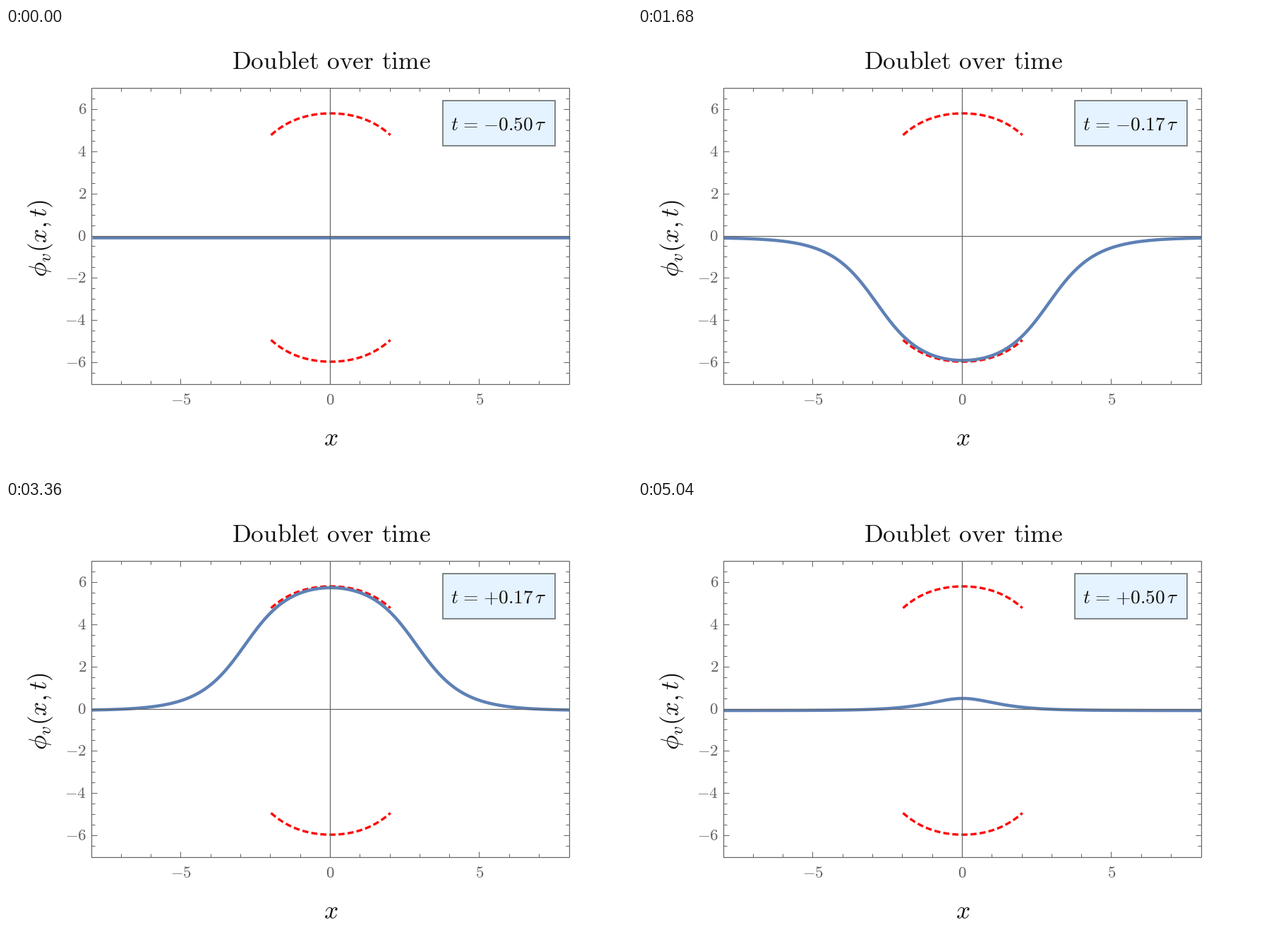
A matplotlib script that plays this animation: 887x631 px, repeating every 5.12 s.

```python
import numpy as np
import matplotlib.pyplot as plt
from matplotlib.animation import FuncAnimation
from matplotlib.patches import Rectangle

W, H, DPI = 887, 631, 64
FRAMES, INTERVAL = 64, 80
PT = 72 / DPI                       # points per pixel

X0, Y0 = 458.9, 294.5               # position of the origin
SX, SY = 42.3, 29.92                # pixels per unit
LEFT, RIGHT, TOP, BOTTOM = 120.5, 797.5, 84.5, 504.5
GREY, BLUE, RED = "#626262", "#5e81b5", "#ff0505"

V = 0.1
GAMMA = 1 / np.sqrt(1 + V**2)
TAU = 2 * np.pi / (GAMMA * V)

plt.rcParams["mathtext.fontset"] = "cm"
fig = plt.figure(figsize=(W / DPI, H / DPI), dpi=DPI, facecolor="white")
ax = fig.add_axes([0, 0, 1, 1])
ax.set_xlim(0, W)
ax.set_ylim(H, 0)
ax.axis("off")


def doublet(x, phase):
    return 4 * np.arctan(np.sin(phase) / (V * np.cosh(GAMMA * x)))


def curve_points(x, phase):
    """Pixel positions of the curve, which sits slightly below the axis."""
    return X0 + 1.2 + SX * x, Y0 + 2.6 - SY * doublet(x, phase)


def label(x, y, tex, size, color="#111111", ha="center", **kw):
    return ax.text(x, y, f"${tex}$", fontsize=size * PT, color=color,
                   ha=ha, va="baseline", **kw)


def rule(xs, ys, width=1.2, z=4):
    ax.plot(xs, ys, color=GREY, lw=width * PT, zorder=z,
            solid_capstyle="butt")


def draw_frame():
    ax.add_patch(Rectangle((LEFT, TOP), RIGHT - LEFT, BOTTOM - TOP,
                           fill=False, ec=GREY, lw=1.2 * PT, zorder=4))
    rule([LEFT, RIGHT], [Y0, Y0])
    rule([X0, X0], [TOP, BOTTOM])

    for n in range(-7, 8):
        x, size = X0 + SX * n, 8 if n % 5 == 0 else 5
        rule([x, x], [TOP, TOP + size], 1)
        rule([x, x], [BOTTOM, BOTTOM - size], 1)
        if n % 5 == 0:
            label(x + 0.3, 534.5, n, 23, GREY)

    for n in range(-13, 14):
        y, size = Y0 - SY * n / 2, 8 if n % 4 == 0 else 5
        rule([LEFT, LEFT + size], [y, y], 1)
        rule([RIGHT, RIGHT - size], [y, y], 1)
        if n % 4 == 0:
            label(114, y + 7, n // 2, 23, GREY, ha="right")


def draw_envelope():
    x = np.linspace(-2, 2, 200)
    for phase in (np.pi / 2, -np.pi / 2):
        ax.plot(*curve_points(x, phase), color=RED, lw=3.4 * PT, zorder=2,
                dashes=(8.6 / 3.4, 4.3 / 3.4), dash_capstyle="butt")


draw_frame()
draw_envelope()
gap = r"\hspace{0.38}"
label(460.5, 58.4, rf"\mathrm{{Doublet}}{gap}\mathrm{{over}}{gap}\mathrm{{time}}",
      35.3)
label(460.5, 592, "x", 35.3)
label(58, 297.5, r"\phi_v(x,t)", 35.3, rotation=90, rotation_mode="anchor")

ax.add_patch(Rectangle((619, 103), 159, 64, fc="#e5f2ff",
                       ec="#808688", lw=2 * PT, zorder=5))
clock = label(697.8, 144.5, "t", 27.3, zorder=6)

grid = np.linspace(-8, 8, 500)
wave, = ax.plot([], [], color=BLUE, lw=4.5 * PT, zorder=3,
                solid_capstyle="butt")


def update(i):
    t = -0.5 + i / TAU              # one time unit per step, in periods
    wave.set_data(*curve_points(grid, 2 * np.pi * t))
    text = f"{t:+.2f}"
    clock.set_text(rf"$t\hspace{{0.117}}=\hspace{{0.117}}"
                   rf"{{{text[0]}}}{text[1:]}\,\tau$")
    return wave, clock


anim = FuncAnimation(fig, update, frames=FRAMES, interval=INTERVAL,
                     repeat=True, repeat_delay=0)
plt.show()
```
